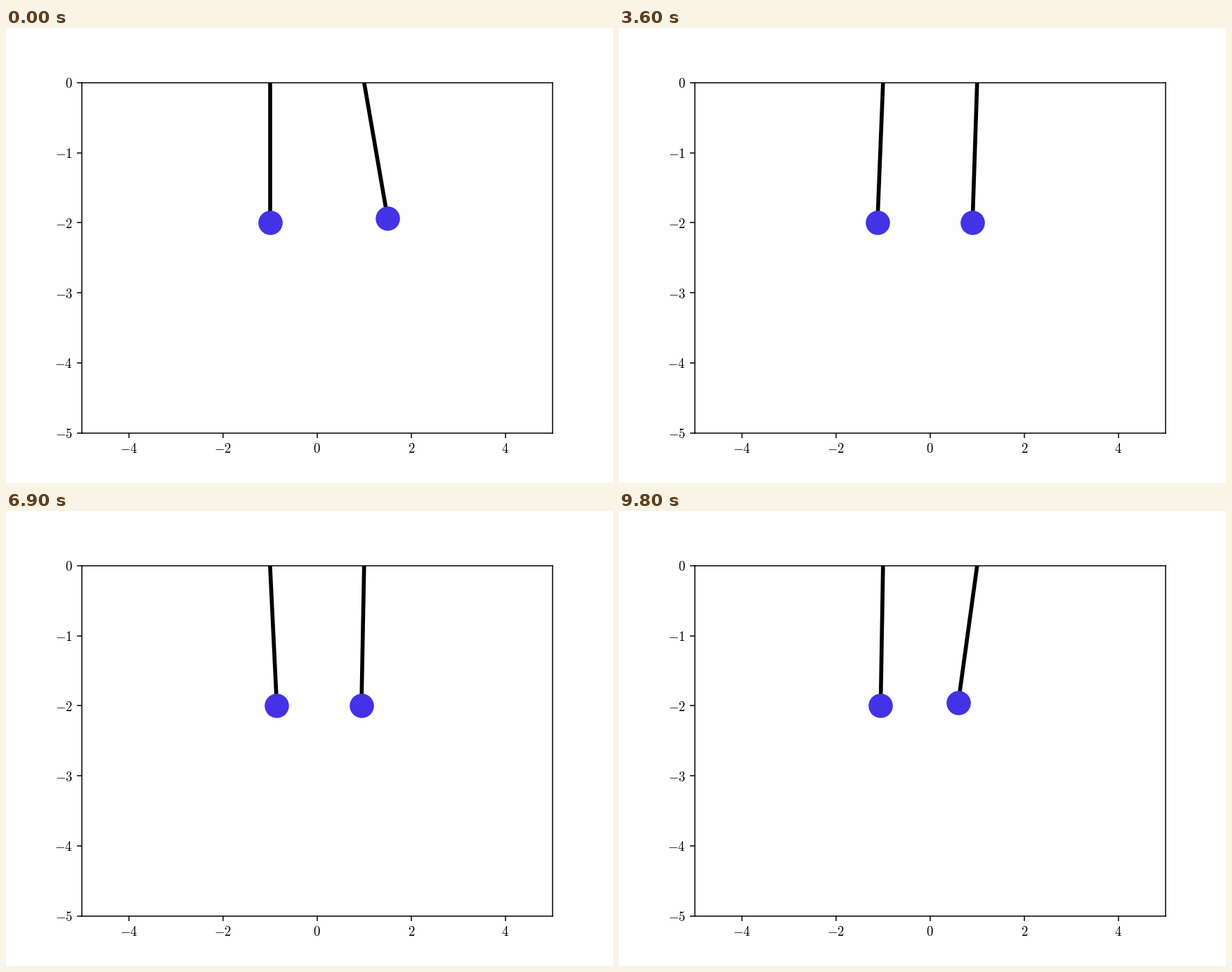
Recreate the animation shown at these times as a matplotlib script. Size 864 px wide and 648 px high, loop 9.9 s.

```python
import numpy as np
import matplotlib.pyplot as plt
from matplotlib.animation import FuncAnimation

FRAMES = 99
INTERVAL = 100          # ms
LENGTH = 2.0            # rod length
SWING = 0.5             # largest sideways displacement
BEAT = 2 * np.pi / 100  # energy exchange, radians per frame
CARRIER = 2 * np.pi / 5  # fast swing, radians per frame
PIVOTS = (-1.0, 1.0)
PAPER = "#fefefe"
BALL = "#4432e6"

plt.rcParams["mathtext.fontset"] = "cm"


def offsets(frame):
    """Sideways displacement of the left and right bob."""
    swing = SWING * np.cos(CARRIER * frame)
    return -swing * np.sin(BEAT * frame), swing * np.cos(BEAT * frame)


def bobs(frame):
    """Positions of both bobs as rows of (x, y)."""
    dx = np.array(offsets(frame))
    return np.column_stack((PIVOTS + dx, -np.sqrt(LENGTH**2 - dx**2)))


def math_labels(values):
    return [f"${v}$" for v in values]


fig, ax = plt.subplots(figsize=(6.4, 4.8), dpi=135, facecolor=PAPER)
ax.set_facecolor(PAPER)
ax.set(xlim=(-5, 5), ylim=(-5, 0))
x_ticks, y_ticks = range(-4, 5, 2), range(-5, 1)
ax.set_xticks(x_ticks, math_labels(x_ticks))
ax.set_yticks(y_ticks, math_labels(y_ticks))

rods = [ax.plot([], [], color="black", lw=3)[0] for _ in PIVOTS]
balls = ax.scatter(*bobs(0).T, s=340, color=BALL, linewidths=0, zorder=2.4)


def update(frame):
    ends = bobs(frame)
    for rod, pivot, (x, y) in zip(rods, PIVOTS, ends):
        rod.set_data([pivot, x], [0, y])
    balls.set_offsets(ends)
    return [*rods, balls]


anim = FuncAnimation(fig, update, frames=FRAMES, interval=INTERVAL,
                     repeat=True, repeat_delay=0, blit=False)
plt.show()
```
